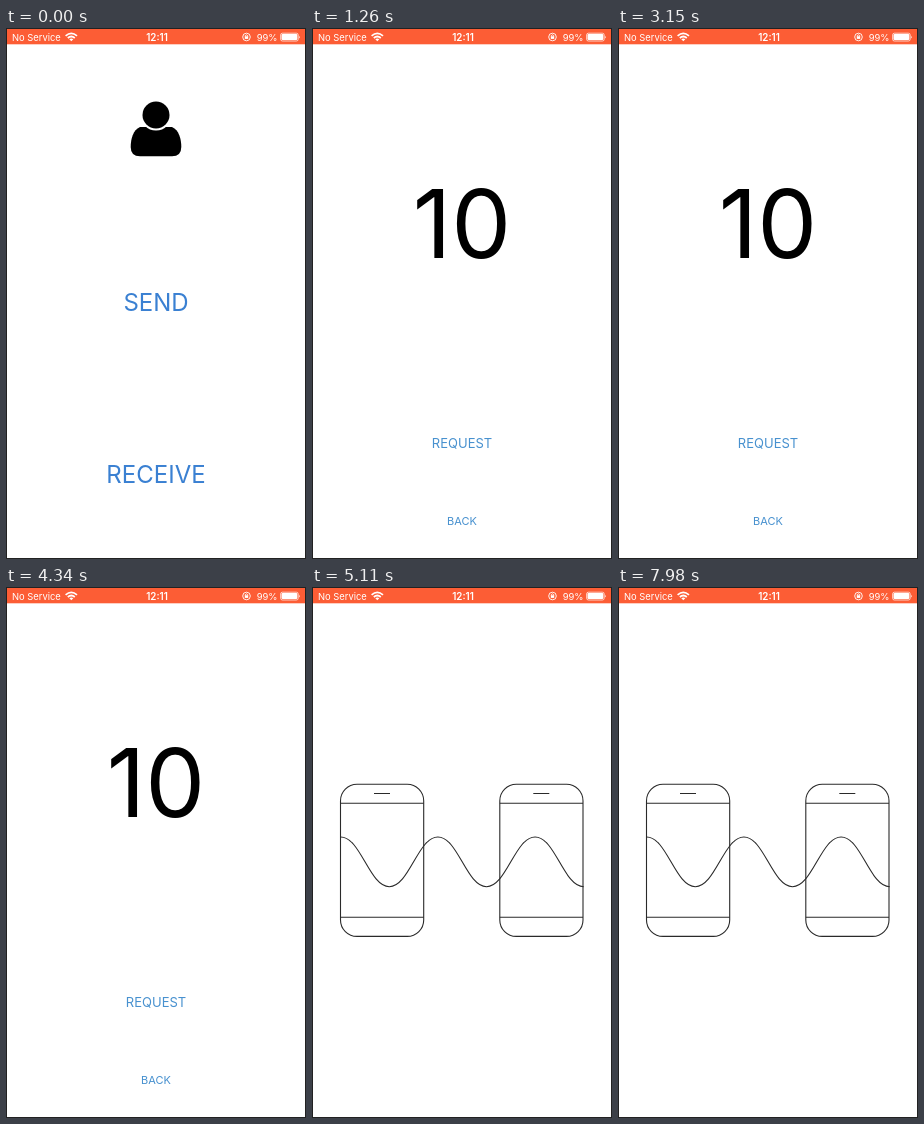
Animation, 300 px wide and 531 px high, one loop 8 s. Source, as an HTML page:

```html
<!DOCTYPE html>
<html lang="en">
<head>
<meta charset="utf-8">
<title>Send and receive</title>
<style>
  html, body { margin: 0; width: 100%; height: 100%; overflow: hidden; background: #fff; }
  svg { display: block; width: 100%; height: 100%; font-family: Inter, Roboto, sans-serif; }
  .mid { text-anchor: middle; }
  .big { font-size: 24px; fill: #3a80d2; }
  .small { fill: #4891cf; }
  .line { fill: none; stroke: #2a2a2a; stroke-width: 1.1; }
</style>
</head>
<body>
<svg viewBox="0 0 300 531" preserveAspectRatio="none">
  <defs>
    <g id="phone" class="line">
      <rect x="28.5" y="197.2" width="83.2" height="152.2" rx="16.5"/>
      <path d="M28.5 216.3H111.7M28.5 330.3H111.7M62 206.5H78"/>
    </g>
  </defs>

  <rect width="300" height="531" fill="#fff"/>
  <g id="home">
    <path d="M134 99C127 102 124.7 111 124.7 119Q124.7 128.3 134 128.3H166Q175.3 128.3 175.3 119C175.3 111 173 102 166 99Z"/>
    <circle cx="150" cy="87" r="15.6" fill="#fff"/>
    <circle cx="150" cy="87" r="13.5"/>
    <text class="mid big" x="150" y="282.5">SEND</text>
    <text class="mid big" x="150" y="455">RECEIVE</text>
  </g>

  <g id="amount">
    <rect width="300" height="531" fill="#fff"/>
    <text class="mid" x="150" y="229.5" font-size="95">10</text>
    <text class="mid small" x="150" y="419.5" font-size="13">REQUEST</text>
    <text class="mid small" x="150" y="497" font-size="11">BACK</text>
  </g>

  <g id="transfer">
    <rect width="300" height="531" fill="#fff"/>
    <use href="#phone"/>
    <use href="#phone" x="159.3"/>
    <path id="wave" class="line"/>
  </g>

  <g id="status" fill="#fff" font-size="9.4">
    <rect width="300" height="16.3" fill="#fc5d35"/>
    <text x="6" y="12.5">No Service</text>
    <path d="M59.6 7.8Q65.3 2.8 71 7.8M61.8 10Q65.3 7 68.8 10" fill="none" stroke="#fff" stroke-width="1.7"/>
    <path d="M63.3 11.2Q65.3 9.6 67.3 11.2L65.3 13.2Z"/>
    <text class="mid" x="151" y="12.6" font-size="9.8" font-weight="600">12:11</text>
    <g fill="none" stroke="#fff" stroke-width=".9">
      <circle cx="240.5" cy="9" r="3.8"/>
      <path d="M239.3 8.6V7.6Q240.5 6 241.7 7.6V8.6"/>
      <rect x="274.6" y="5.2" width="17.6" height="7.8" rx="1.8" stroke-width=".7"/>
    </g>
    <rect x="238.8" y="8.3" width="3.4" height="2.6"/>
    <text x="250.7" y="12.5">99%</text>
    <rect x="275.5" y="6.1" width="15.8" height="6" rx="1"/>
    <path d="M293 7.7Q294.6 9.1 293 10.5Z"/>
  </g>

  <rect x=".5" y=".5" width="299" height="530" fill="none" stroke="#222"/>
</svg>
<script>
  const LOOP = 8000, STEP = 70, HEIGHT = 531;
  const SPRING = 18; // per second, critically damped
  const el = id => document.getElementById(id);
  const sheets = [[el('amount'), 490], [el('transfer'), 4620]];

  // Five half waves, from a crest on the left to a trough on the right
  function wavePath() {
    const half = 48.6, crest = 250, trough = 299.7, bend = half * 0.41;
    let x = 28.7, d = `M${x} ${crest}`;
    for (let i = 0; i < 5; i++) {
      const [from, to] = i % 2 ? [trough, crest] : [crest, trough];
      d += `C${x + bend} ${from} ${x + half - bend} ${to} ${x + half} ${to}`;
      x += half;
    }
    return d;
  }

  function slide(t, start) {
    const k = Math.max(0, t - start) / 1000 * SPRING;
    const y = HEIGHT * (1 + k) * Math.exp(-k);
    return y < 0.8 ? 0 : y;
  }

  function draw(time) {
    const t = Math.floor(time % LOOP / STEP) * STEP;
    for (const [sheet, start] of sheets) {
      sheet.setAttribute('transform', `translate(0 ${slide(t, start).toFixed(2)})`);
    }
  }

  el('wave').setAttribute('d', wavePath());
  const begin = performance.now();
  function tick() {
    draw(performance.now() - begin);
    requestAnimationFrame(tick);
  }
  tick();
</script>
</body>
</html>
```
